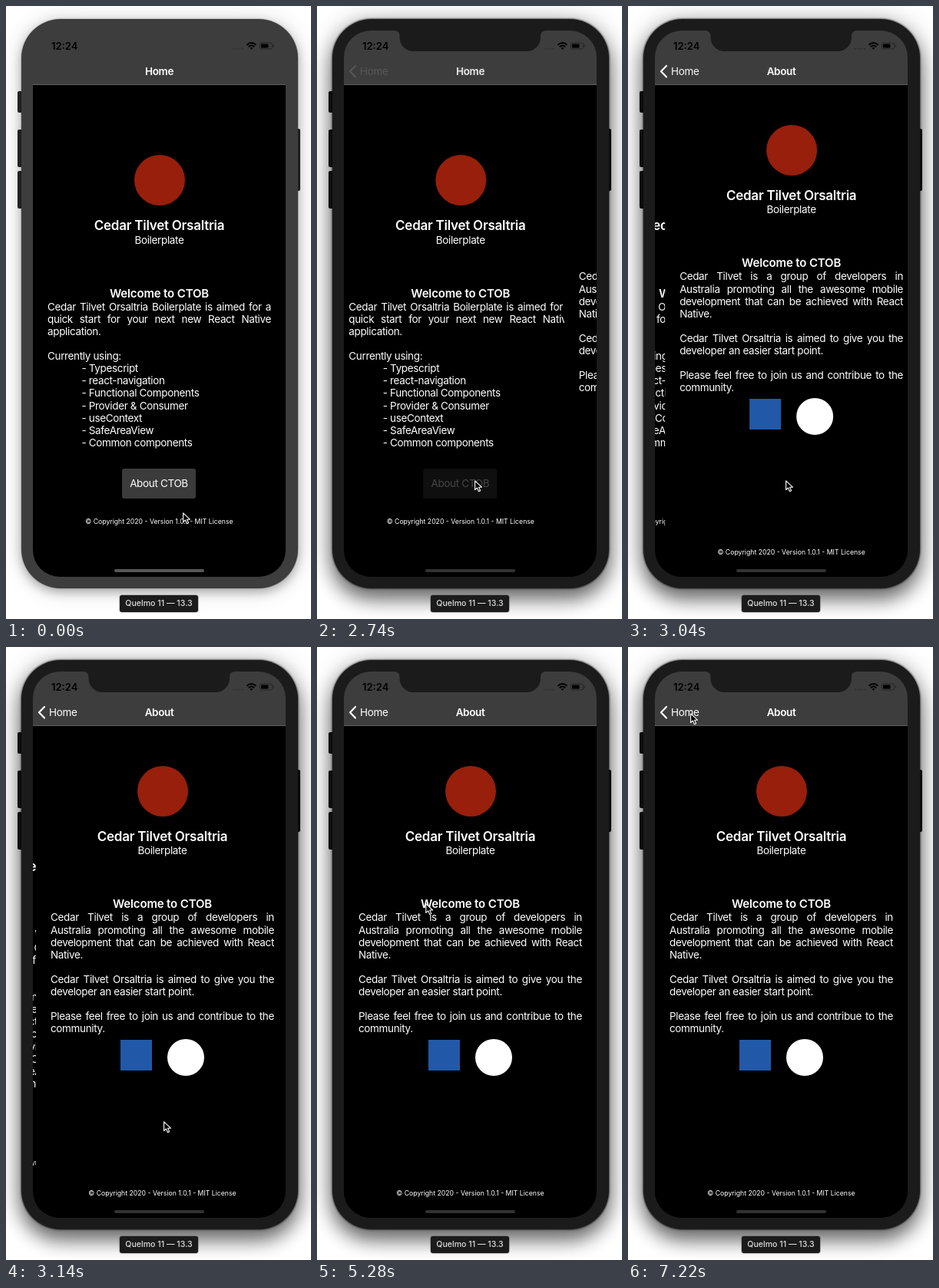
Write an HTML page that moves like this. It is 397x799 px and loops after 8000 ms.

```html
<!DOCTYPE html>
<html lang="en">
<head>
<meta charset="utf-8">
<title>App walkthrough</title>
<style>
html, body { margin: 0; width: 100%; height: 100%; overflow: hidden; background: #fff; }
body { position: relative; font: 13.5px/16px Inter, sans-serif; letter-spacing: -.35px; color: #fff; }
div, svg { position: absolute; }
#body { left: 19.5px; top: 16.5px; width: 360px; height: 742px; border-radius: 51px; background: #3d3d3d;
  box-shadow: 0 0 1px .5px rgba(0,0,0,.25), 0 5px 13px rgba(0,0,0,.28), 0 2px 30px rgba(0,0,0,.16); }
.key { background: #292929; border-radius: 2px; }
#screen { left: 35px; top: 32px; width: 329px; height: 712px; border-radius: 35px; overflow: hidden; }
.page { left: 0; top: 0; width: 329px; height: 712px; background: #000; clip-path: inset(70px 0 0); }
.line { white-space: nowrap; height: 16px; }
.mid { left: 0; width: 329px; text-align: center; }
.just { left: 19px; width: 291px; text-align: justify; text-align-last: justify; }
.name { font-size: 17px; font-weight: 600; letter-spacing: -.25px; }
.bold { font-size: 15px; font-weight: 600; letter-spacing: -.15px; }
.small { font-size: 8.7px; letter-spacing: 0; }
.dot { background: #971f0b; border-radius: 50%; width: 66px; height: 66px; left: 131.5px; }
#button { left: 116px; top: 570.5px; width: 96px; height: 39px; line-height: 39px; border-radius: 3px;
  background: #3b3b3b; text-align: center; white-space: nowrap; }
#bar { left: 0; top: 0; width: 329px; height: 70px; background: #3d3d3d; border-bottom: 1px solid #626262; }
.title { font-weight: 600; }
#time { left: 24px; top: 12px; font-size: 13px; font-weight: 600; letter-spacing: 0; color: #000; }
#grip { left: 106px; top: 702px; width: 117px; height: 4px; border-radius: 2px; background: #575757; }
#label { left: 148px; top: 768px; width: 102px; height: 22px; line-height: 22px; border-radius: 3px;
  background: #1b1b1b; color: #dedede; text-align: center; font-size: 10.6px; font-weight: 500; letter-spacing: 0;
  white-space: nowrap; box-shadow: 0 0 1px .5px rgba(0,0,0,.4); }
#top { left: 0; top: 0; }
.active #body { background: #1b1b1b;
  box-shadow: 0 0 2px 1px rgba(0,0,0,.5), 0 15px 24px rgba(0,0,0,.48), 0 3px 32px rgba(0,0,0,.32); }
.active .key { background: #171717; }
.active #grip { background: #323232; }
#notch { visibility: hidden; }
.active #notch { visibility: visible; }
</style>
</head>
<body>
<div class="key" style="left:15px;top:111px;width:7px;height:28px"></div>
<div class="key" style="left:15px;top:161px;width:7px;height:49px"></div>
<div class="key" style="left:15px;top:215px;width:7px;height:49px"></div>
<div class="key" style="left:376px;top:160px;width:7px;height:81px"></div>
<div id="body"></div>
<div id="screen">
  <div class="page" id="home"><div id="button">About CTOB</div></div>
  <div class="page" id="about">
    <div style="left:110px;top:480px;width:41px;height:40px;background:#2159a8"></div>
    <div style="left:170.5px;top:479px;width:48px;height:48px;border-radius:50%;background:#fff"></div>
  </div>
  <div id="bar">
    <div id="time" class="line">12:24</div>
    <div class="line mid title" id="homeTitle" style="top:45px">Home</div>
    <div class="line mid title" id="aboutTitle" style="top:45px">About</div>
    <div id="back" style="left:0;top:0">
      <svg width="30" height="70"><path d="M15 46L8 53.2L15 60.5" fill="none" stroke="#fff" stroke-width="2.2" stroke-linecap="round" stroke-linejoin="round"/></svg>
      <div class="line" style="left:21px;top:45px">Home</div>
    </div>
  </div>
  <div id="grip"></div>
</div>
<div id="label">Quelmo 11 — 13.3</div>
<svg id="top" width="397" height="799">
  <path id="notch" fill="#1b1b1b" d="M101 31V32Q107.5 32.5 107.5 39V41A18 18 0 0 0 125.5 59H273A18 18 0 0 0 291 41V39Q291 32.5 297.5 32V31Z"/>
  <path d="M295 55.5H309" stroke="#303030" stroke-width="1.6" stroke-dasharray="2.4 1.4"/>
  <g fill="none" stroke="#000" stroke-width="1.9">
    <path d="M313.5 50.8Q319.5 45.4 325.5 50.8M315.8 53.2Q319.5 50 323.2 53.2"/>
    <path d="M317.6 54.8Q319.5 53.4 321.4 54.8L319.5 57Z" fill="#000" stroke="none"/>
    <rect x="330.5" y="48" width="16" height="8" rx="2" stroke="#222" stroke-width=".9"/>
    <path d="M348.4 50.5V53.5" stroke="#222" stroke-width="1.2"/>
    <rect x="332" y="49.5" width="9.5" height="5" rx="1" fill="#000" stroke="none"/>
  </g>
  <path id="cursor" d="M.6 .8V12.6L3.4 10L5.5 14.8L7.6 13.8L5.6 9.2H9.4Z" fill="#000" stroke="#fff" stroke-width="1.1" stroke-linejoin="round"/>
</svg>
<script>
const LOOP = 8000, WIDTH = 329, STEP = 16.1;
const $ = id => document.getElementById(id);
const clamp = v => Math.max(0, Math.min(1, v));
const span = (t, a, b) => clamp((t - a) / (b - a));
const mix = (a, b, k) => a + (b - a) * k;
const smooth = k => k * k * (3 - 2 * k);

// y is the vertical centre on the stage
function line(page, text, y, kind, x) {
  const el = document.createElement("div");
  el.className = "line " + kind;
  el.textContent = text;
  el.style.top = y - 40 + "px";
  if (x !== undefined) el.style.left = x + "px";
  page.append(el);
}

// A leading "=" marks a justified line, a leading "-" an indented item
function paragraph(page, y, lines) {
  lines.forEach((s, i) => {
    const at = y + i * STEP;
    if (s[0] === "=") line(page, s.slice(1), at, "just");
    else if (s) line(page, s, at, "", s[0] === "-" ? 63.5 : 19);
  });
}

function heading(page, dy, footY) {
  const dot = document.createElement("div");
  dot.className = "dot";
  dot.style.top = 162 + dy + "px";
  page.append(dot);
  line(page, "Cedar Tilvet Orsaltria", 286 + dy, "mid name");
  line(page, "Boilerplate", 304.7 + dy, "mid");
  line(page, "Welcome to CTOB", 374.5 + dy, "mid bold");
  line(page, "© Copyright 2020 - Version 1.0.1 - MIT License", footY, "mid small");
}

heading($("home"), 0, 672.3);
paragraph($("home"), 391.7, [
  "=Cedar Tilvet Orsaltria Boilerplate is aimed for a",
  "=quick start for your next new React Native",
  "application.", "",
  "Currently using:",
  "- Typescript", "- react-navigation", "- Functional Components", "- Provider & Consumer",
  "- useContext", "- SafeAreaView", "- Common components"
]);
heading($("about"), -39.3, 711.6);
paragraph($("about"), 352.4, [
  "=Cedar Tilvet is a group of developers in",
  "=Australia promoting all the awesome mobile",
  "=development that can be achieved with React",
  "Native.", "",
  "=Cedar Tilvet Orsaltria is aimed to give you the",
  "developer an easier start point.", "",
  "=Please feel free to join us and contribue to the",
  "community."
]);

// Critically damped spring
function pushed(t) {
  if (t < 2740) return 0;
  if (t >= 3540) return 1;
  const u = t < 2900 ? .605 + (t - 2740) * .01525 : 3.04 + (t - 2900) * .014;
  return 1 - (1 + u) * Math.exp(-u);
}

// start, end, x, y
const moves = [
  [10, 140, 215, 638],
  [370, 540, 205, 618],
  [4790, 5600, 104, 168],
  [5810, 6020, 80, 84],
  [6950, 7060, 81, 86]
];

function pointer(t) {
  let x = 230, y = 660;
  for (const [a, b, tx, ty] of moves) {
    const k = span(t, a, b), e = (k + smooth(k)) / 2;
    x = mix(x, tx, e);
    y = mix(y, ty, e);
  }
  return [x, y];
}

function draw(t) {
  const p = pushed(t), [x, y] = pointer(t);
  document.body.classList.toggle("active", t >= 2400);
  $("home").style.transform = `translateX(${-.3 * WIDTH * p}px)`;
  $("about").style.transform = `translateX(${WIDTH * (1 - p)}px)`;
  $("homeTitle").style.opacity = 1 - p;
  $("aboutTitle").style.opacity = p;
  $("back").style.opacity = p;
  const press = smooth(span(t, 2430, 2580));
  const release = t < 2740 ? 0 : smooth(span(t, 2690, 2980));
  $("button").style.opacity = 1 - .8 * press * (1 - release);
  $("cursor").setAttribute("transform", `translate(${x} ${y})`);
}

const start = performance.now();
function tick() {
  draw((performance.now() - start) % LOOP);
  requestAnimationFrame(tick);
}
tick();
</script>
</body>
</html>
```
